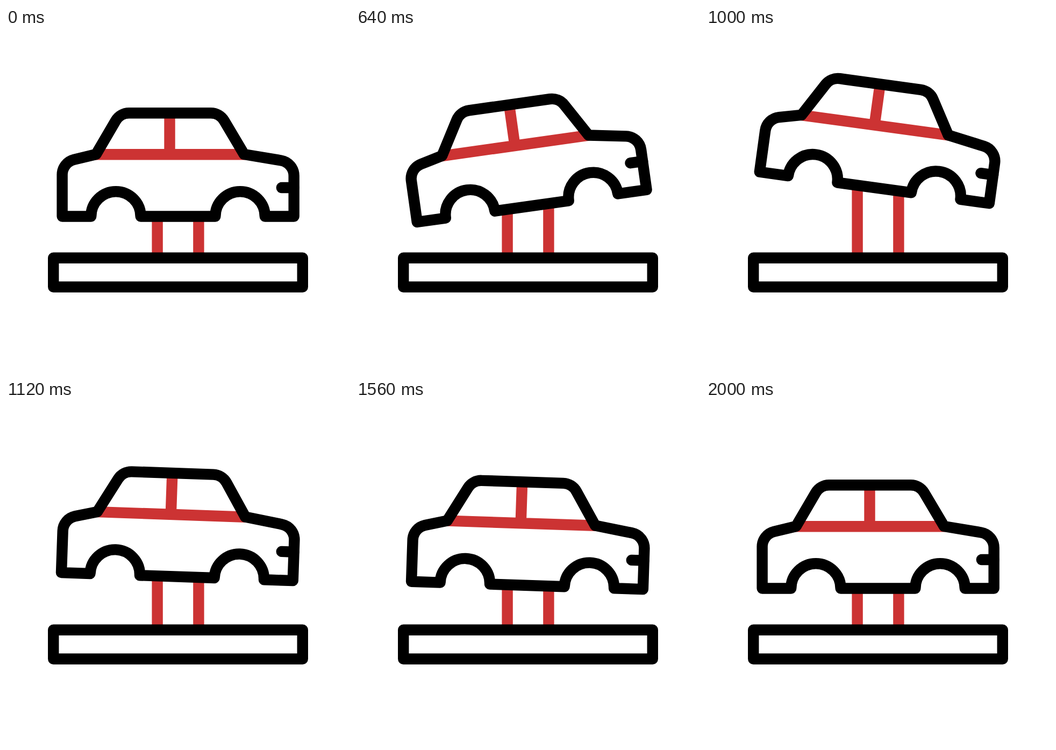
Recreate the animation shown at these times as an HTML page. Size 640 by 640 pixels, loop 2.08 s.

```html
<!DOCTYPE html>
<html lang="en">
<head>
<meta charset="utf-8">
<title>Car on a lift</title>
<style>
  html, body { margin: 0; width: 100%; height: 100%; overflow: hidden; background: #fff; }
  svg { display: block; width: 100%; height: 100%; }
  path { fill: none; stroke: #000; stroke-width: 20.4; stroke-linejoin: round; }
  .red { stroke: #c33; }
  .round { stroke-linecap: round; }
</style>
</head>
<body>
<svg viewBox="0 0 640 640">
  <path id="legs" class="red"/>
  <path d="M88.2 427.8H551.8V481.8H88.2Z"/>
  <g id="car">
    <path class="red round" d="M167.5 235.2H443M304.5 160V235.2"/>
    <path d="M104.6 350.5V273A28.9 28.9 0 0 1 126.4 244.9L167.5 235L204 172.7
      A28.9 28.9 0 0 1 229 158.3H381A28.9 28.9 0 0 1 406 172.7L443 235L511.7 246.5
      A28.9 28.9 0 0 1 535.7 275V350.5H481.8A46.2 46.2 0 0 0 389.4 350.5
      H250.6A46.2 46.2 0 0 0 158.2 350.5Z"/>
    <path class="round" d="M512.8 297H535.7"/>
  </g>
</svg>
<script>
const LOOP = 2080, STEP = 40;
// Keys are [time in ms, value]
const lift = [[40, 0], [470, 17], [860, -72], [1312, 10], [1660, -9.5], [2000, 0]];
const tilt = [[320, 0], [640, -8], [960, 8], [1280, -4], [1600, 2], [2000, 0]];
const car = document.getElementById('car');
const legs = document.getElementById('legs');

// Symmetric ease in and out; a larger power is steeper in the middle
function ease(u, power) {
  const a = u ** power, b = (1 - u) ** power;
  return a / (a + b);
}

function valueAt(keys, t, power) {
  const i = keys.findIndex(key => key[0] > t);
  if (i < 0) return keys[keys.length - 1][1];
  if (i === 0) return keys[0][1];
  const [t0, v0] = keys[i - 1], [t1, v1] = keys[i];
  return v0 + (v1 - v0) * ease((t - t0) / (t1 - t0), power);
}

function draw(now) {
  const t = Math.floor(now % LOOP / STEP) * STEP;
  const y = valueAt(lift, t, 1.5), angle = valueAt(tilt, t, 2.1);
  const slope = Math.tan(angle * Math.PI / 180);
  const leg = x => `M${x} 428V${350.5 + y + (x - 320) * slope}`;
  car.setAttribute('transform', `translate(0 ${y}) rotate(${angle} 320 300)`);
  legs.setAttribute('d', leg(281.6) + leg(358.4));
}

const start = performance.now();
function tick() {
  draw(performance.now() - start);
  requestAnimationFrame(tick);
}
tick();
</script>
</body>
</html>
```
